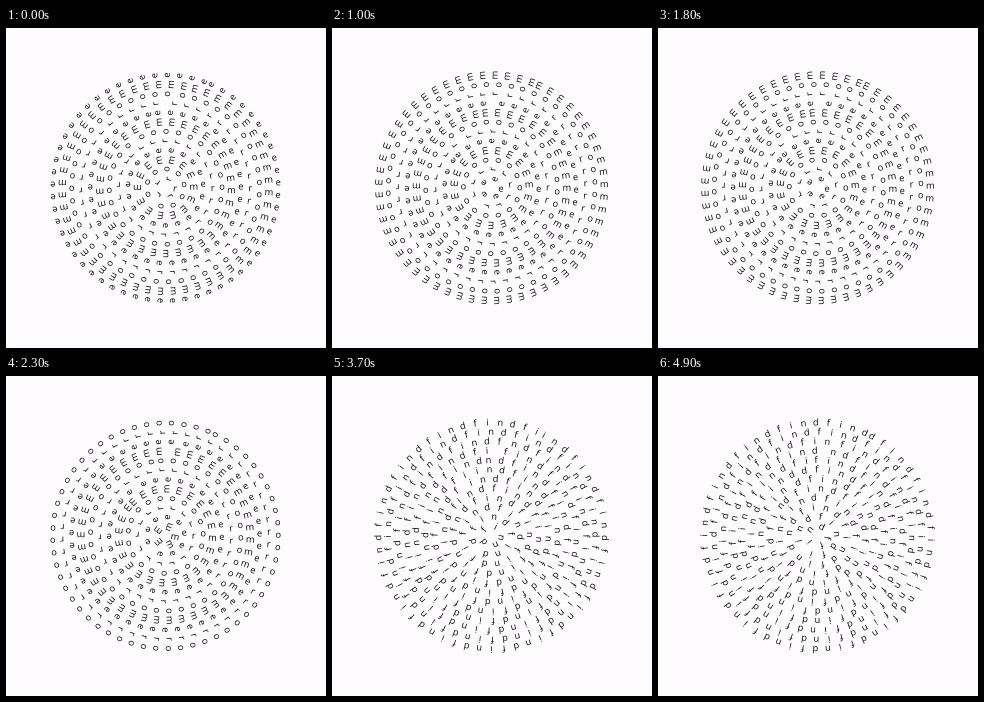
Write an HTML page with a canvas that moves like this. It is 320 px wide and 320 px high and loops after 5 s.

```html
<!DOCTYPE html>
<html lang="en">
<head>
<meta charset="utf-8">
<title>Rings of letters</title>
<style>
  html, body { margin: 0; width: 100%; height: 100%; overflow: hidden; background: #fefcfe; }
  canvas { display: block; width: 320px; height: 320px; }
</style>
</head>
<body>
<canvas id="stage"></canvas>
<script>
const SIZE = 320, LOOP = 5000, STEP = 100, SWITCH = 2500;
const RINGS = 12, GAP = 9.4, PER_RING = 4.72;
const PITCH = 2 * Math.PI / PER_RING;
const RAD = Math.PI / 180;

const canvas = document.getElementById('stage');
const ctx = canvas.getContext('2d');
const scale = window.devicePixelRatio || 1;
canvas.width = canvas.height = SIZE * scale;

function letter(char, radius, angle, tilt) {
  ctx.save();
  ctx.rotate(angle);
  ctx.translate(radius, 0);
  ctx.rotate(tilt);
  ctx.fillText(char, 0, 0);
  ctx.restore();
}

function draw(ms) {
  const sec = ms / 1000;
  const stage = Math.floor(sec);
  const radial = ms < SWITCH;

  ctx.setTransform(scale, 0, 0, scale, 0, 0);
  ctx.fillStyle = '#fefcfe';
  ctx.fillRect(0, 0, SIZE, SIZE);
  ctx.translate(159.6, 159.8);
  ctx.fillStyle = '#08080a';
  ctx.font = '500 9.3px "Open Sans", "Noto Sans", sans-serif';
  ctx.textAlign = 'center';
  ctx.textBaseline = 'middle';

  // "rome" runs outward ring by ring, "find" runs on along the rings
  let index = 2 * stage;
  let angle = (62 + 0.95 * sec) * RAD;
  for (let k = 1; k <= RINGS; k++) {
    const count = Math.round(PER_RING * k);
    for (let j = 0; j < count; j++, index++) {
      const char = radial ? 'rome'[(k - 1 - stage + 8) % 4] : 'find'[index % 4];
      letter(char, GAP * k, angle, radial ? 0 : Math.PI / 2);
      angle += PITCH / k;
    }
    // one empty place before the next ring
    angle += PITCH / k;
  }
}

let last = -1;
function tick() {
  const ms = Math.floor((performance.now() % LOOP) / STEP) * STEP;
  if (ms !== last) draw(last = ms);
  requestAnimationFrame(tick);
}
tick();
</script>
</body>
</html>
```
